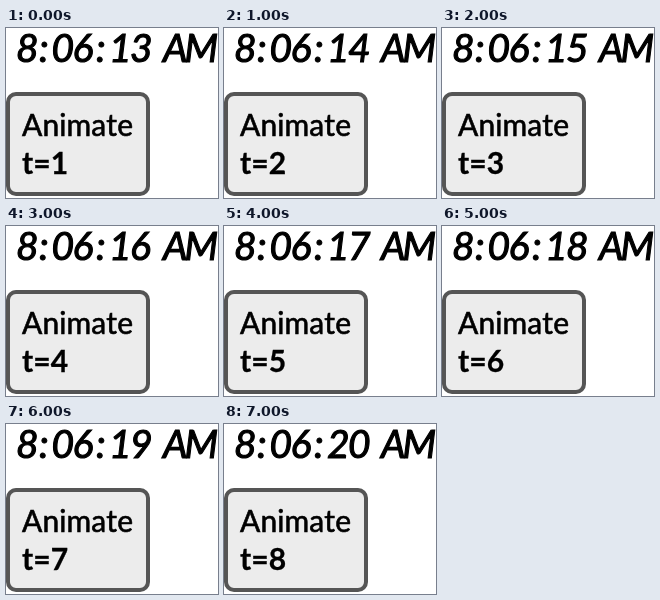
Write an HTML page that moves like this. It is 212 by 170 pixels and loops after 8 s.

```html
<!DOCTYPE html>
<html lang="en">
<head>
<meta charset="utf-8">
<title>Clock</title>
<style>
  html, body { margin: 0; width: 100%; height: 100%; overflow: hidden; background: #fff; }
  svg { display: block; width: 212px; height: 170px; }
  text {
    font: 30px Lato, "Open Sans", sans-serif;
    font-kerning: none;
    font-variant-numeric: tabular-nums;
    letter-spacing: .1px;
    stroke: #000;
    stroke-width: .6;
  }
  .clock { font-size: 39px; font-style: italic; letter-spacing: -1.7px; stroke-width: 1.1; }
  .period { letter-spacing: -3px; }
  .count { font-weight: 700; stroke-width: .3; }
  .box { fill: #ececec; stroke: #555; stroke-width: 4; }
</style>
</head>
<body>
<svg viewBox="0 0 212 170">
  <text class="clock" y="33.5"><tspan x="10">8</tspan><tspan x="33">:</tspan><tspan x="45.5">06</tspan><tspan x="90">:</tspan><tspan id="seconds" x="103">13</tspan><tspan class="period" x="157">AM</tspan></text>
  <rect class="box" x="2" y="66" width="140" height="100" rx="8"/>
  <text x="16" y="108">Animate</text>
  <text class="count" x="16" y="146">t=<tspan id="count">1</tspan></text>
</svg>
<script>
  const STEPS = 8, FIRST_SECOND = 13;
  const seconds = document.getElementById('seconds');
  const count = document.getElementById('count');
  let start = null, shown = -1;

  function tick(now) {
    start ??= now;
    const step = Math.floor((now - start) / 1000) % STEPS;
    if (step !== shown) {
      shown = step;
      seconds.textContent = FIRST_SECOND + step;
      count.textContent = 1 + step;
    }
    requestAnimationFrame(tick);
  }
  requestAnimationFrame(tick);
</script>
</body>
</html>
```
